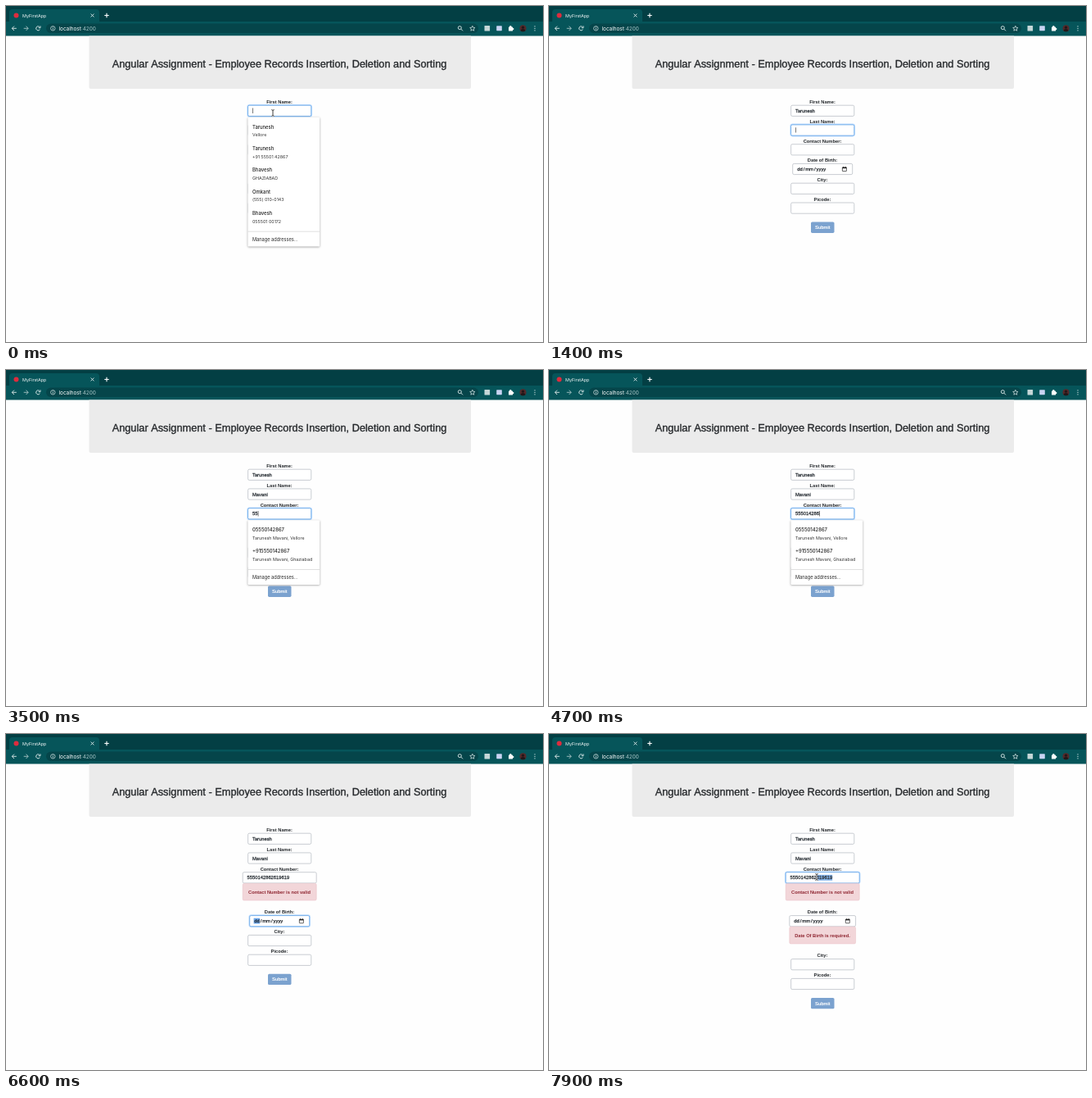
An HTML page with a canvas for the animation above (8000 ms loop, 656 by 410 pixels).

```html
<!DOCTYPE html>
<html lang="en">
<head>
<meta charset="utf-8">
<title>MyFirstApp</title>
<style>
html, body { margin: 0; width: 656px; height: 410px; overflow: hidden; background: #fefefe; }
canvas { display: block; width: 656px; height: 410px; }
</style>
</head>
<body>
<canvas id="stage"></canvas>
<script>
const LOOP = 8000;
const SANS = '"Liberation Sans", Arial, sans-serif';
const UI = 'Inter, Roboto, sans-serif';
const canvas = document.getElementById('stage');
const ctx = canvas.getContext('2d');
const dpr = window.devicePixelRatio || 1;
canvas.width = 656 * dpr;
canvas.height = 410 * dpr;

const FIRST = 'Tarunesh', LAST = 'Mavani', PHONE = '5550142862619619';
const FULL = FIRST + ' ' + LAST;
// key press times in tenths of a second
const KEYS = {
  first: [3, 4, 5, 7, 8, 9, 10, 11],
  last: [16, 17, 18, 20, 21, 22],
  phone: [33, 35, 36, 38, 40, 42, 43, 45, 46, 48, 49, 51, 52, 54, 55, 57]
};
const FOCUS = [[-1000, 'first'], [1200, 'last'], [2300, 'phone'], [6000, 'date'], [7300, 'phone']];
const PHONE_ERROR = 6000, DATE_ERROR = 7300;

const PEOPLE = [
  [FIRST, 'Vellore'], [FIRST, '+91 55501 42867'], ['Bhavesh', 'GHAZIABAD'],
  ['Omkant', '(555) 010-0143'], ['Bhavesh', '055501 00172']
];
const LAST_NAMES = [[LAST, FIRST + ', Vellore'], [LAST, FIRST + ', Ghaziabad']];
const PHONES = [['05550142867', FULL + ', Vellore'], ['+915550142867', FULL + ', Ghaziabad']];

const clamp = v => Math.max(0, Math.min(1, v));
const ease = v => { v = clamp(v); return v * v * (3 - 2 * v); };
const mix = (a, b, k) => a + (b - a) * k;

function rect(x, y, w, h, fill, r = 0) {
  ctx.fillStyle = fill;
  ctx.beginPath();
  ctx.roundRect(x, y, w, h, r);
  ctx.fill();
}

function outline(x, y, w, h, color, r, width = 0.8) {
  ctx.strokeStyle = color;
  ctx.lineWidth = width;
  ctx.beginPath();
  ctx.roundRect(x, y, w, h, r);
  ctx.stroke();
}

function disc(x, y, r, fill) {
  ctx.fillStyle = fill;
  ctx.beginPath();
  ctx.arc(x, y, r, 0, 7);
  ctx.fill();
}

function line(points, color, width = 1) {
  ctx.strokeStyle = color;
  ctx.lineWidth = width;
  ctx.beginPath();
  points.forEach(([x, y], i) => i ? ctx.lineTo(x, y) : ctx.moveTo(x, y));
  ctx.stroke();
}

// weight adds a thin stroke for a medium face
function text(s, x, y, font, color, align = 'left', weight = 0) {
  ctx.font = font;
  ctx.textAlign = align;
  ctx.textBaseline = 'alphabetic';
  ctx.fillStyle = color;
  ctx.fillText(s, x, y);
  if (weight) {
    ctx.strokeStyle = color;
    ctx.lineWidth = weight;
    ctx.lineJoin = 'round';
    ctx.strokeText(s, x, y);
  }
  return ctx.measureText(s).width;
}

function drawBrowser() {
  const ink = '#e3eeee';
  rect(0, 0, 656, 20, '#033f44');
  rect(4, 4, 110, 20, '#06555a', 4);
  rect(0, 19, 656, 17.5, '#06555a');
  rect(49, 21.5, 528, 11.5, '#05454a', 5.7);
  disc(12.5, 11.5, 3, '#dd2c3e');
  text('MyFirstApp', 20, 13.6, '5.4px ' + UI, '#f2f7f7');
  line([[103.6, 9.6], [107.4, 13.4]], ink, 0.9);
  line([[107.4, 9.6], [103.6, 13.4]], ink, 0.9);
  line([[120.3, 11.5], [125.7, 11.5]], '#fff', 1.1);
  line([[123, 8.8], [123, 14.2]], '#fff', 1.1);

  for (const [x, d, c] of [[10, -1, ink], [24.5, 1, '#a9c5c6']]) {
    line([[x - 2.8 * d, 27.3], [x + 2.5 * d, 27.3]], c, 0.9);
    line([[x, 24.6], [x + 2.7 * d, 27.3], [x, 30]], c, 0.9);
  }
  ctx.strokeStyle = ink;
  ctx.lineWidth = 0.9;
  ctx.beginPath();
  ctx.arc(39.2, 27.3, 2.5, 0.5, 5.6);
  ctx.stroke();
  line([[42, 24.4], [42, 26.7], [39.7, 26.7]], ink, 0.9);
  ctx.lineWidth = 0.7;
  ctx.beginPath();
  ctx.arc(57.3, 27.3, 2.7, 0, 7);
  ctx.stroke();
  rect(56.9, 26.8, 0.8, 2, ink);
  rect(56.9, 25.4, 0.8, 0.8, ink);
  const w = text('localhost', 64.5, 29.6, '6.4px ' + UI, '#fff');
  text(':4200', 64.5 + w, 29.6, '6.4px ' + UI, '#a9c7c8');

  ctx.strokeStyle = ink;
  ctx.lineWidth = 0.9;
  ctx.beginPath();
  ctx.arc(554.3, 26.6, 2, 0, 7);
  ctx.stroke();
  line([[555.8, 28.1], [558, 30.3]], ink, 0.9);
  const star = [];
  for (let i = 0; i <= 10; i++) {
    const r = i % 2 ? 1.5 : 3.3, a = i * Math.PI / 5 - Math.PI / 2;
    star.push([569.8 + r * Math.cos(a), 27.5 + r * Math.sin(a)]);
  }
  line(star, ink, 0.7);
  rect(584.5, 24, 6.6, 6.6, '#c5d7d8', 0.6);
  rect(599.2, 24.2, 6.6, 6, '#c9d4f3', 0.6);
  rect(614, 25.5, 5, 5, '#fff', 0.6);
  disc(616.3, 25.2, 1.2, '#fff');
  disc(619.2, 28, 1.2, '#fff');

  ctx.save();
  ctx.beginPath();
  ctx.arc(631.5, 27.3, 4, 0, 7);
  ctx.clip();
  rect(627, 23, 9, 9, '#54292a');
  disc(631.5, 26.2, 1.6, '#211719');
  disc(631.5, 31, 3.1, '#211719');
  ctx.restore();
  for (const y of [24.8, 27.3, 29.8]) disc(646, y, 0.65, ink);
}

function drawHeader() {
  rect(101.5, 36.5, 466.5, 64.5, '#ebebeb', [0, 0, 2, 2]);
  text('Angular Assignment - Employee Records Insertion, Deletion and Sorting',
    334, 75, '12.78px ' + SANS, '#26292c', 'center', 0.35);
}

function typed(s, keys, t) {
  return s.slice(0, keys.filter(k => k * 100 <= t).length);
}

function focusAt(t) {
  let i = 0;
  while (i + 1 < FOCUS.length && FOCUS[i + 1][0] <= t) i++;
  const [since, name] = FOCUS[i];
  const k = ease((t - since) / 150);
  return {
    name, since,
    glow: id => id === name ? k : i && FOCUS[i - 1][1] === id ? 1 - k : 0
  };
}

function label(s, y) {
  text(s, 334, y + 2, 'bold 5.75px ' + SANS, '#212529', 'center');
}

function box(y, half, glow) {
  const x = 334.2 - half, w = half * 2;
  if (glow > 0) outline(x, y - 6.6, w, 13.2, `rgba(0,123,255,${0.25 * glow})`, 2, 2.6);
  rect(x, y - 6.6, w, 13.2, '#fff', 1.6);
  const c = [[188, 95], [193, 160], [199, 228]].map(([a, b]) => Math.round(mix(a, b, glow)));
  outline(x, y - 6.6, w, 13.2, `rgb(${c})`, 1.6);
}

const FIELD_FONT = '5.8px ' + SANS;

function value(s, x, y) {
  return text(s, x, y + 2.1, FIELD_FONT, '#30363c', 'left', 0.28);
}

function caret(x, y) {
  rect(x + 0.3, y - 3.3, 0.6, 6.4, '#222');
}

function errorBar(y, half, s) {
  rect(334.2 - half, y, half * 2, 20.6, '#f2d6d9', 1.6);
  outline(334.2 - half, y, half * 2, 20.6, '#ebc4c9', 1.6, 0.6);
  text(s, 334, y + 12.5, 'bold 5.72px ' + SANS, '#8f2631', 'center');
}

function dateText(x, y, active) {
  if (active) rect(x - 0.3, y - 3.5, 7.4, 6.8, '#6ba6ea');
  const parts = [['dd', 0.3], ['/', 7.8], ['mm', 10.3], ['/', 21.1], ['yyyy', 23.6]];
  for (const [s, dx] of parts)
    text(s, x + dx, y + 1.9, '5.9px ' + SANS, '#24292e', 'left', 0.25);
}

function calendar(x, y) {
  outline(x - 2.5, y - 2, 5, 4.6, '#222', 0.4, 0.7);
  rect(x - 2.5, y - 2.3, 5, 1.5, '#222');
  rect(x - 1.8, y - 3, 0.7, 1, '#222');
  rect(x + 1.1, y - 3, 0.7, 1, '#222');
}

function dropdown(fieldY, rows) {
  const x = 295.4, y = fieldY + 8, w = 87.8;
  const first = fieldY + 19.6, foot = first + rows.length * 26.4 + 5.2;
  ctx.save();
  ctx.shadowColor = 'rgba(0,0,0,0.4)';
  ctx.shadowBlur = 2.5 * dpr;
  ctx.shadowOffsetY = 0.7 * dpr;
  rect(x, y, w, foot + 9 - y, '#fff', 1.2);
  ctx.restore();
  rows.forEach(([main, sub], i) => {
    const cy = first + i * 26.4;
    text(main, 301, cy + 2.1, '500 5.9px ' + UI, '#222');
    text(sub, 301, cy + 11.8, '5.35px ' + UI, '#333');
  });
  rect(x, foot - 9.8, w, 0.7, '#d6d6d6');
  text('Manage addresses...', 301, foot + 2, '5.65px ' + UI, '#2b2b2b');
}

function pointer(t) {
  const k = ease((t - 6800) / 500), d = ease((t - 7400) / 500);
  return { x: mix(mix(326, 346, k), 327, d), y: mix(130.5, 174.5, k), seen: t < 300 || t >= 6800 };
}

function iBeam({ x, y }) {
  for (const [c, w] of [['#fff', 1.8], ['#111', 0.8]]) {
    line([[x, y - 3.2], [x, y + 3.2]], c, w);
    line([[x - 1.7, y - 3.9], [x, y - 3.2], [x + 1.7, y - 3.9]], c, w);
    line([[x - 1.7, y + 3.9], [x, y + 3.2], [x + 1.7, y + 3.9]], c, w);
  }
}

function drawForm(t) {
  const focus = focusAt(t), mouse = pointer(t);
  const badPhone = t >= PHONE_ERROR, badDate = t >= DATE_ERROR;
  const s1 = badPhone ? 29.2 : 0, s2 = s1 + (badDate ? 29.2 : 0);
  const values = {
    first: typed(FIRST, KEYS.first, t),
    last: typed(LAST, KEYS.last, t),
    phone: typed(PHONE, KEYS.phone, t)
  };
  const rows = [
    ['first', 'First Name:', 117, 38.6], ['last', 'Last Name:', 140.7, 38.6],
    ['phone', 'Contact Number:', 164.5, badPhone ? 45 : 38.6],
    ['date', 'Date of Birth:', 188.2 + s1, badDate ? 40.4 : 36.5],
    ['city', 'City:', 212 + s2, 38.6], ['pin', 'Picode:', 235.8 + s2, 38.6]
  ];
  const blinkOn = start => (t - start) % 1060 < 530;

  for (const [id, name, ly, half] of rows) {
    const y = ly + 10.8, x = 334.2 - half + 5.4;
    label(name, ly);
    box(y, half, focus.glow(id));
    if (id === 'date') {
      dateText(x - 0.2, y, focus.name === id);
      calendar(334.2 + half - 9.8, y);
      continue;
    }
    const s = values[id] || '';
    if (id === 'phone' && t > 7400) {
      ctx.font = FIELD_FONT;
      const w = ctx.measureText('0').width;
      const from = Math.round((mouse.x - x) / w);
      if (from < s.length) rect(x + from * w, y - 3.5, (s.length - from) * w, 7, '#86b4ea');
    }
    const w = s ? value(s, x, y) : 0;
    if (focus.name !== id || t > 7400) continue;
    const last = KEYS[id].filter(k => k * 100 <= t).pop() * 100 || 0;
    if (blinkOn(Math.max(last, focus.since, 0))) caret(x + w, y);
  }
  if (badPhone) errorBar(182.4, 45, 'Contact Number is not valid');
  if (badDate) errorBar(235.3, 40.4, 'Date Of Birth is required.');

  const by = 263.5 + s2;
  rect(320, by, 28.5, 13.4, '#7ba2cf', 1.6);
  text('Submit', 334.2, by + 8.7, '5.9px ' + SANS, '#fff', 'center', 0.2);

  if (t < 1200) dropdown(127.8, values.first ? PEOPLE.slice(0, 2) : PEOPLE);
  else if (values.last && t < 2300) dropdown(151.5, LAST_NAMES);
  else if (values.phone && values.phone.length < 10) dropdown(175.3, PHONES);

  if (mouse.seen) iBeam(mouse);
}

function frame(now) {
  const t = Math.floor((now % LOOP + 5) / 100) * 100 % LOOP;
  ctx.setTransform(dpr, 0, 0, dpr, 0, 0);
  rect(0, 0, 656, 410, '#fefefe');
  drawBrowser();
  drawHeader();
  drawForm(t);
}

const start = performance.now();
function tick() {
  frame(performance.now() - start);
  requestAnimationFrame(tick);
}
tick();
</script>
</body>
</html>
```
